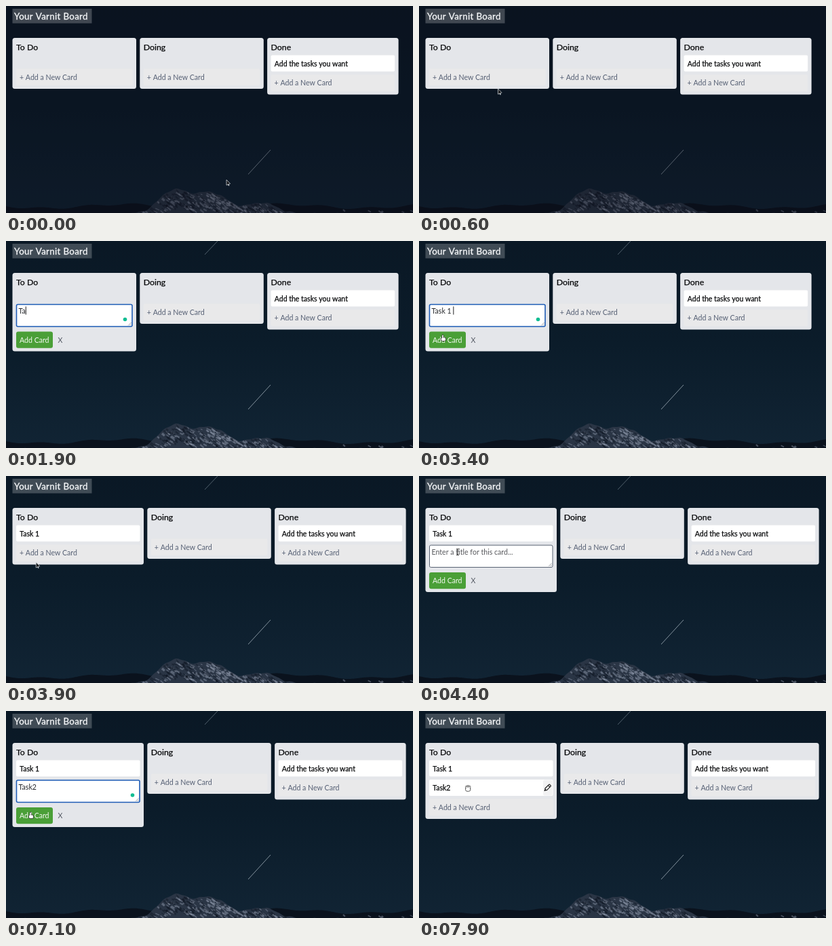
An HTML page with a canvas that plays this animation: 600x305 px, repeating every 8000 ms.

```html
<!DOCTYPE html>
<html lang="en">
<head>
<meta charset="utf-8">
<title>Task board</title>
<style>
  html, body { margin: 0; width: 100%; height: 100%; overflow: hidden; background: #0a1825; }
  canvas { display: block; width: 600px; height: 305px; }
</style>
</head>
<body>
<canvas id="stage"></canvas>
<script>
const W = 600, H = 305, LOOP = 8000;
const canvas = document.getElementById('stage');
const ctx = canvas.getContext('2d');
const ratio = window.devicePixelRatio || 1;
canvas.width = W * ratio;
canvas.height = H * ratio;

const INK = '#08090b';
const LEFT = 9.5, GAP = 5.3, ROW = 28.5;

// Each entry form: when it opens, gains focus, is typed into and is submitted.
const SESSIONS = [
  { open: 1000, focus: 1400, type: 1750, pace: 100, submit: 3650, value: 'Task 1 ' },
  { open: 4200, focus: 4750, type: 5650, pace: 150, submit: 7300, value: 'Task2' }
];
const MOUSE_START = { x: 325, y: 256 };
const MOUSE_MOVES = [
  { at: 250, x: 87, y: 103 },
  { at: 2800, x: 35, y: 138 },
  { at: 3700, x: 57, y: 112 },
  { at: 6600, x: 36, y: 149 },
  { at: 7350, x: 72, y: 114 }
];
const MOVE_TIME = 450;

function random(seed) {
  return () => (seed = (seed * 16807) % 2147483647) / 2147483647;
}

const bump = (x, center, spread) => Math.exp(-(((x - center) / spread) ** 2));

function line(x1, y1, x2, y2, color, width = 1, g = ctx) {
  g.beginPath();
  g.moveTo(x1, y1);
  g.lineTo(x2, y2);
  g.strokeStyle = color;
  g.lineWidth = width;
  g.stroke();
}

function box(x, y, w, h, fill, radius = 0, stroke, width = 1) {
  ctx.beginPath();
  ctx.roundRect(x, y, w, h, radius);
  ctx.fillStyle = fill;
  ctx.fill();
  if (!stroke) return;
  ctx.strokeStyle = stroke;
  ctx.lineWidth = width;
  ctx.stroke();
}

function text(str, x, y, color, { size = 10.6, heavy = 0, spacing = 0 } = {}) {
  ctx.font = `${size}px Lato, sans-serif`;
  ctx.letterSpacing = spacing + 'px';
  ctx.fillStyle = ctx.strokeStyle = color;
  ctx.fillText(str, x, y);
  if (heavy) {
    ctx.lineWidth = heavy;
    ctx.strokeText(str, x, y);
  }
  return ctx.measureText(str).width;
}

const ridgeY = x => H + 1 - 33 * bump(x, 246, 30) - 31 * bump(x, 302, 36) - 16 * bump(x, 378, 30)
  + Math.sin(x / 2.7) * 0.6 + Math.sin(x / 5.3) * 0.8;
const hillsY = x => 295 + 3 * Math.sin(x / 37) + 1.5 * Math.sin(x / 11);

function ridge(g, heightAt, fill) {
  g.beginPath();
  g.moveTo(0, H);
  for (let x = 0; x <= W; x += 2) g.lineTo(x, heightAt(x));
  g.lineTo(W, H);
  g.fillStyle = fill;
  g.fill();
}

function snow(g, count, heightAt, left, right, lightAt) {
  const rnd = random(41);
  for (let i = 0; i < count; i++) {
    const x = left + rnd() * (right - left);
    const y = heightAt(x) + 0.5 + rnd() * 26;
    const run = 2 + rnd() * 5;
    const light = rnd() < lightAt(x);
    const color = light ? 'rgba(157,168,186,.42)' : 'rgba(13,21,33,.42)';
    line(x, y, x + run, y + run * (0.4 + rnd() * 0.6), color, 1 + rnd() * 1.8, g);
  }
}

function paintScenery() {
  const layer = document.createElement('canvas');
  layer.width = canvas.width;
  layer.height = canvas.height;
  const g = layer.getContext('2d');
  g.scale(ratio, ratio);
  const sky = g.createLinearGradient(0, 0, 0, H);
  sky.addColorStop(0, '#0a1825');
  sky.addColorStop(0.5, '#0b1c2a');
  sky.addColorStop(1, '#112434');
  g.fillStyle = sky;
  g.fillRect(0, 0, W, H);

  ridge(g, hillsY, '#0a121d');
  snow(g, 60, hillsY, 480, W, () => 0.4);
  ridge(g, ridgeY, '#2a3545');
  g.save();
  g.clip();
  snow(g, 480, ridgeY, 190, 425, x => 0.3 + 0.5 * bump(x, 315, 30) + 0.15 * bump(x, 390, 25));
  g.restore();
  line(357, 248, 390, 212, 'rgba(160,174,184,.8)', 1, g);
  return layer;
}
const scenery = paintScenery();

function drawBackground(t) {
  ctx.drawImage(scenery, 0, 0, W, H);
  if (t < 1800) {
    ctx.fillStyle = 'rgba(9,11,22,.35)';
    ctx.fillRect(0, 0, W, H);
  } else {
    line(293, 20, 312, 0, 'rgba(150,165,176,.5)');
  }
  box(LEFT, 4, 117, 21.5, 'rgba(255,255,255,.22)');
  text('Your Varnit Board', 12, 20, '#f4f6f8', { size: 13.33, heavy: 0.3, spacing: 0.33 });
}

const rowTop = cards => cards.length ? 72.5 + ROW * cards.length : 92.5;

function drawForm(y, right, form) {
  const stroke = form.focused ? '#1d5bb5' : '#596273';
  box(15.5, y + 1, right - 16, 32.5, '#fff', 2, stroke, form.focused ? 1.6 : 1);
  for (const size of [4.5, 2]) {
    line(right - 1.8 - size, y + 32, right - 1.8, y + 32 - size, '#777c84', 0.7);
  }
  const hint = 'Enter a title for this card...';
  const width = text(form.value || hint, 18.5, y + 14.7, form.value ? '#26282c' : '#57585c');
  if (form.focused) {
    const caretX = 19 + (form.value ? width : 0);
    if (form.caret) line(caretX, y + 4, caretX, y + 16, INK, 0.9);
    ctx.beginPath();
    ctx.arc(right - 11, y + 23, 2.8, 0, 7);
    ctx.fillStyle = '#10bd92';
    ctx.fill();
  }
  box(15, y + 41, 54, 24.3, '#4a9f37', 3);
  text('Add Card', 20, y + 57, '#f5faf3');
  text('X', 76.5, y + 57, '#555a64');
}

function drawList(x, title, cards, form) {
  const width = cards.length ? 193.5 : 182.5;
  const rowY = rowTop(cards);
  box(x, 47, width, rowY + (form ? 70 : 29.5) - 47, '#e4e6ea', 3.5);
  text(title, x + 5.5, 64.5, INK, { size: 12.3, heavy: 0.25 });
  cards.forEach((card, i) => {
    const y = 72.5 + ROW * i;
    box(x + 5.5, y, width - 11, 24, '#fff', 2);
    text(card, x + 10.7, y + 16.2, INK, { size: 10.5, heavy: 0.25 });
  });
  if (form) {
    drawForm(rowY, x + width - 5.5, form);
  } else {
    box(x + 5.5, rowY, width - 11, 24.5, '#e9e9ea', 2);
    text('+ Add a New Card', x + 10.5, rowY + 16, '#566074');
  }
  return x + width + GAP;
}

function drawPencil(x, y) {
  box(x - 6.5, y - 11.5, 13.5, 23, '#f2f2f3', 2);
  ctx.save();
  ctx.translate(x, y);
  ctx.rotate(-Math.PI / 4);
  box(-4, -1.8, 9.5, 3.6, '#fff', 0.8, '#111', 1.1);
  line(3, -1.8, 3, 1.8, '#111');
  line(-6.5, 0, -4, 0, '#111', 1.8);
  ctx.restore();
}

const cursors = {
  arrow() {
    ctx.beginPath();
    ctx.moveTo(0, 0);
    ctx.lineTo(0, 8);
    ctx.lineTo(5.6, 5.8);
    ctx.closePath();
    ctx.fillStyle = '#17191d';
    ctx.fill();
    ctx.strokeStyle = '#dfe4e8';
    ctx.lineWidth = 0.7;
    ctx.stroke();
    line(2.6, 6.5, 3.8, 9, '#dfe4e8', 1.2);
  },
  ibeam() {
    line(0, -4, 0, 4, '#222');
    for (const y of [-4.5, 4.5]) line(-2, y, 2, y, '#222', 0.8);
  },
  pointer() {
    box(-1, 0, 2, 7, '#fff', 1, '#222', 0.8);
    box(-2.5, 4, 7, 5.5, '#fff', 2, '#222', 0.8);
    box(-0.6, 1, 1.2, 6, '#fff');
  },
  grab() {
    for (let i = 0; i < 4; i++) {
      box(-3.4 + i * 1.8, -3.5 - Math.sin(i), 1.8, 5, '#fff', 0.9, '#333', 0.7);
    }
    box(-3.4, -1, 7.2, 5.3, '#fff', 2.4, '#333', 0.8);
    box(-2.6, -1.6, 5.6, 2, '#fff');
  }
};

function mouseAt(t) {
  let { x, y } = MOUSE_START;
  for (const move of MOUSE_MOVES) {
    const p = Math.min(1, Math.max(0, (t - move.at) / MOVE_TIME));
    const ease = p * p * (3 - 2 * p);
    x += (move.x - x) * ease;
    y += (move.y - y) * ease;
  }
  return { x, y };
}

function cursorKind({ x, y }, form, cards) {
  const offset = y - rowTop(cards);
  if (x < 15 || x > 186) return 'arrow';
  if (form) {
    if (offset >= 0 && offset < 34) return 'ibeam';
    return x < 69 && offset > 36 && offset < 65 ? 'pointer' : 'arrow';
  }
  if (offset >= 0 && offset < 25) return 'pointer';
  return cards.length && y >= 72 && offset < -4 ? 'grab' : 'arrow';
}

function formAt(t) {
  const session = SESSIONS.find(s => t >= s.open && t < s.submit);
  if (!session) return null;
  const { focus, type, pace, value } = session;
  const count = Math.min(value.length, Math.max(0, Math.floor((t - type) / pace) + 1));
  const lastInput = count ? type + (count - 1) * pace : focus;
  return {
    value: value.slice(0, count),
    focused: t >= focus,
    caret: (t - lastInput) % 1000 < 500,
    typing: count > 0 && !MOUSE_MOVES.some(move => move.at > type && t >= move.at)
  };
}

function drawCursor(t, form, cards) {
  if (form && form.typing) return;
  const mouse = mouseAt(t);
  const kind = cursorKind(mouse, form, cards);
  if (kind === 'grab' && mouse.y >= 101) drawPencil(189.5, 113);
  ctx.save();
  ctx.translate(mouse.x, mouse.y);
  cursors[kind]();
  ctx.restore();
}

function render(t) {
  ctx.setTransform(ratio, 0, 0, ratio, 0, 0);
  drawBackground(t);
  const cards = SESSIONS.filter(s => t >= s.submit).map(s => s.value.trim());
  const form = formAt(t);
  let x = drawList(LEFT, 'To Do', cards, form);
  x = drawList(x, 'Doing', []);
  drawList(x, 'Done', ['Add the tasks you want']);
  drawCursor(t, form, cards);
}

const start = performance.now();
function tick() {
  render((performance.now() - start) % LOOP);
  requestAnimationFrame(tick);
}
tick();
</script>
</body>
</html>
```
